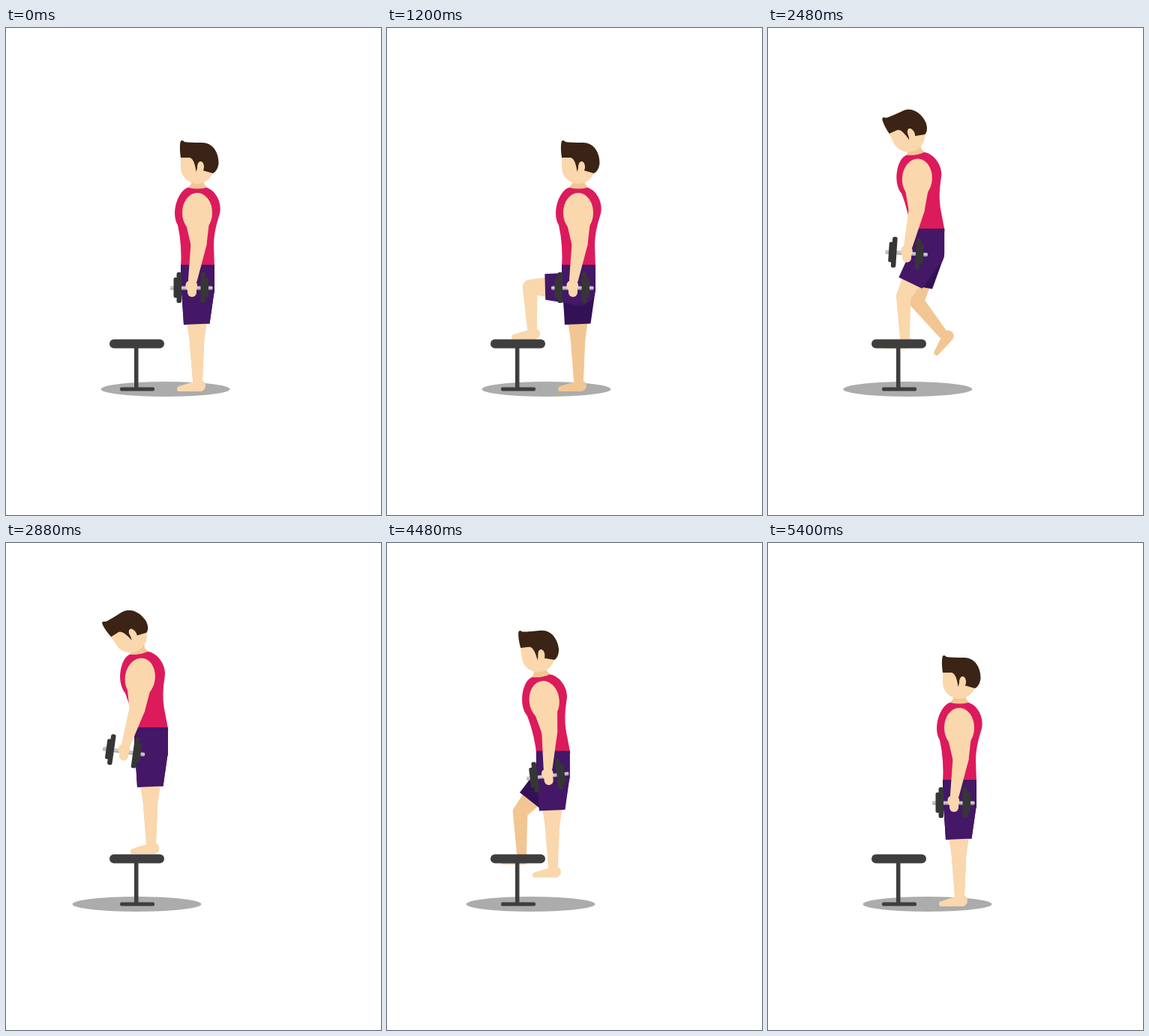
An HTML page with a canvas that plays this animation: 500 by 650 pixels, repeating every 6000 ms.

```html
<!DOCTYPE html>
<html lang="en">
<head>
<meta charset="utf-8">
<title>Dumbbell step-up</title>
<style>
html, body { margin: 0; width: 100%; height: 100%; overflow: hidden; background: #fff; }
canvas { display: block; }
</style>
</head>
<body>
<canvas id="stage" width="500" height="650"></canvas>
<script>
const ctx = document.getElementById('stage').getContext('2d');
const LOOP = 6000, STEP = 40;
const BENCH = '#3e3e3e', PLATE = '#363636', SHIRT = '#dc1b5c', HAIR = '#3b2415';
const NEAR = { skin: '#fad7ac', shorts: '#441767' };
const FAR = { skin: '#f2c693', shorts: '#331156' };

// Everything on the body is drawn in the standing pose, then turned at its joint.
const HIP = [257, 349], KNEE = [255, 415], ANKLE = [255, 472];
const WAIST = [256, 316], SHOULDER = [255, 235], NECK = [258, 205];

function fillPath(color, trace) {
  ctx.fillStyle = color;
  ctx.beginPath();
  trace();
  ctx.fill();
}

function box(color, x, y, w, h, r = 0) {
  fillPath(color, () => ctx.roundRect(x, y, w, h, r));
}

function oval(color, x, y, rx, ry) {
  fillPath(color, () => ctx.ellipse(x, y, rx, ry, 0, 0, 2 * Math.PI));
}

// Two circles joined by their outer tangents.
function taper(color, x1, y1, r1, x2, y2, r2) {
  const along = Math.atan2(y2 - y1, x2 - x1);
  const side = Math.acos((r1 - r2) / Math.hypot(x2 - x1, y2 - y1));
  fillPath(color, () => {
    ctx.arc(x1, y1, r1, along + side, along - side + 2 * Math.PI);
    ctx.arc(x2, y2, r2, along - side, along + side);
  });
}

function outline(color, path) {
  ctx.fillStyle = color;
  ctx.fill(new Path2D(path));
}

function shifted(x, y, draw) {
  ctx.save();
  ctx.translate(x, y);
  draw();
  ctx.restore();
}

function turned([x, y], degrees, draw) {
  shifted(x, y, () => {
    ctx.rotate(degrees * Math.PI / 180);
    ctx.translate(-x, -y);
    draw();
  });
}

function drawLeg({ skin, shorts }, thigh, shin, foot) {
  turned(HIP, thigh, () => {
    taper(skin, 254.5, 390, 13.5, 254.5, 415, 9.8);
    turned(KNEE, shin - thigh, () => {
      taper(skin, 254.5, 415, 9.8, 255.5, 470, 6.5);
      turned(ANKLE, foot - shin, () => taper(skin, 258.5, 477.5, 7.5, 231.5, 481.5, 3.5));
    });
    outline(shorts, 'M234 349L237 396L271.5 394.5L278 349Z');
  });
}

function drawTorso() {
  outline(FAR.skin, 'M247 200H264V208L269 214Q256 219 242 214L247 208Z');
  outline(SHIRT, 'M243 213Q256 216 267 213C280 216 290 236 284 251Q277 272 277 290L278 321H233Q235 290 229 263C219 246 230 216 243 213Z');
}

function drawHead() {
  box(NEAR.skin, 233, 165, 44, 43, [0, 0, 22, 22]);
  outline(HAIR, 'M233 173Q231 160 232.5 152Q234 148 238 152Q245 153 262 153C276 153 284 167 283.5 181Q282 191 276 194L262 190L257 180L253.5 192Q251 173 244 173Z');
  oval(NEAR.skin, 259.5, 185.5, 4.5, 7.5);
}

function drawDumbbell() {
  box('#aaa', 219, 344.5, 56.5, 5, 1.5);
  box('#d0d0d0', 219, 345.5, 56.5, 2, 1);
  for (const x of [227.5, 259.5]) box(PLATE, x, 326, 6.5, 41, 2.5);
  for (const x of [223.5, 264.5]) box(PLATE, x, 333, 5.5, 27, 2);
}

function drawArm() {
  const { skin } = NEAR;
  oval(skin, 255, 246.5, 20, 26.5);
  taper(skin, 255.5, 262, 15, 257, 288, 10.5);
  taper(skin, 257, 288, 10.5, 249, 336, 6);
  box(skin, 239.5, 337, 15.5, 14, 6);
  box(skin, 242, 340, 12, 19, 6);
}

function drawBench() {
  box(BENCH, 171, 425, 5.5, 57);
  box(BENCH, 152, 479.5, 46, 5, 2);
  box(BENCH, 138, 415.5, 73, 12, 6);
}

function poseAt(t) {
  const ease = (from, to) => {
    const u = Math.min(1, Math.max(0, (t - from) / (to - from)));
    return u * u * (3 - 2 * u);
  };
  const pulse = (from, peak, to) => ease(from, peak) - ease(peak, to);

  const lift = ease(600, 1200) - ease(1800, 2880);
  const lower = pulse(4200, 4800, 5400);
  const farShin = -38 * pulse(1800, 2500, 2880) - 2 * lower;
  return {
    rise: ease(1800, 2880) - ease(4200, 4800),
    lean: -9 * (ease(1800, 2500) - ease(2880, 3760) + ease(4000, 4500) - ease(4600, 5400)),
    head: -33 * ease(1800, 2800) + 26.5 * ease(2880, 3760) + 6.5 * ease(4500, 5400),
    arm: 8 * ease(2120, 2880) - 3.5 * ease(2880, 3760) - 11.5 * ease(3760, 4480) + 7 * ease(4500, 5400),
    nearLeg: [91 * lift, -2 * lift, 0],
    farLeg: [
      91 * lower - 9 * pulse(1800, 2120, 2500) + 12 * pulse(2120, 2500, 2880),
      farShin,
      farShin + 2 * lower - 17 * pulse(1800, 2120, 2880)
    ]
  };
}

function draw(t) {
  const { rise, lean, head, arm, nearLeg, farLeg } = poseAt(t);
  const upperBody = part => shifted(0, 2.5 * rise, () => turned(WAIST, lean, part));

  box('#fff', 0, 0, 500, 650);
  oval('#acacac', 212.5 - 38 * rise, 482, 86, 10);
  shifted(-62 * rise, -70 * rise, () => {
    drawLeg(FAR, ...farLeg);
    upperBody(() => {
      drawTorso();
      turned(NECK, head - lean, drawHead);
    });
    drawLeg(NEAR, ...nearLeg);
    box(NEAR.shorts, 233, 316, 45, 55, [0, 0, 22, 22]);
    upperBody(() => turned(SHOULDER, arm - lean, () => {
      drawDumbbell();
      drawArm();
    }));
  });
  drawBench();
}

const start = performance.now();
function tick() {
  const t = (performance.now() - start) % LOOP;
  draw(Math.floor(t / STEP) * STEP);
  requestAnimationFrame(tick);
}
tick();
</script>
</body>
</html>
```
